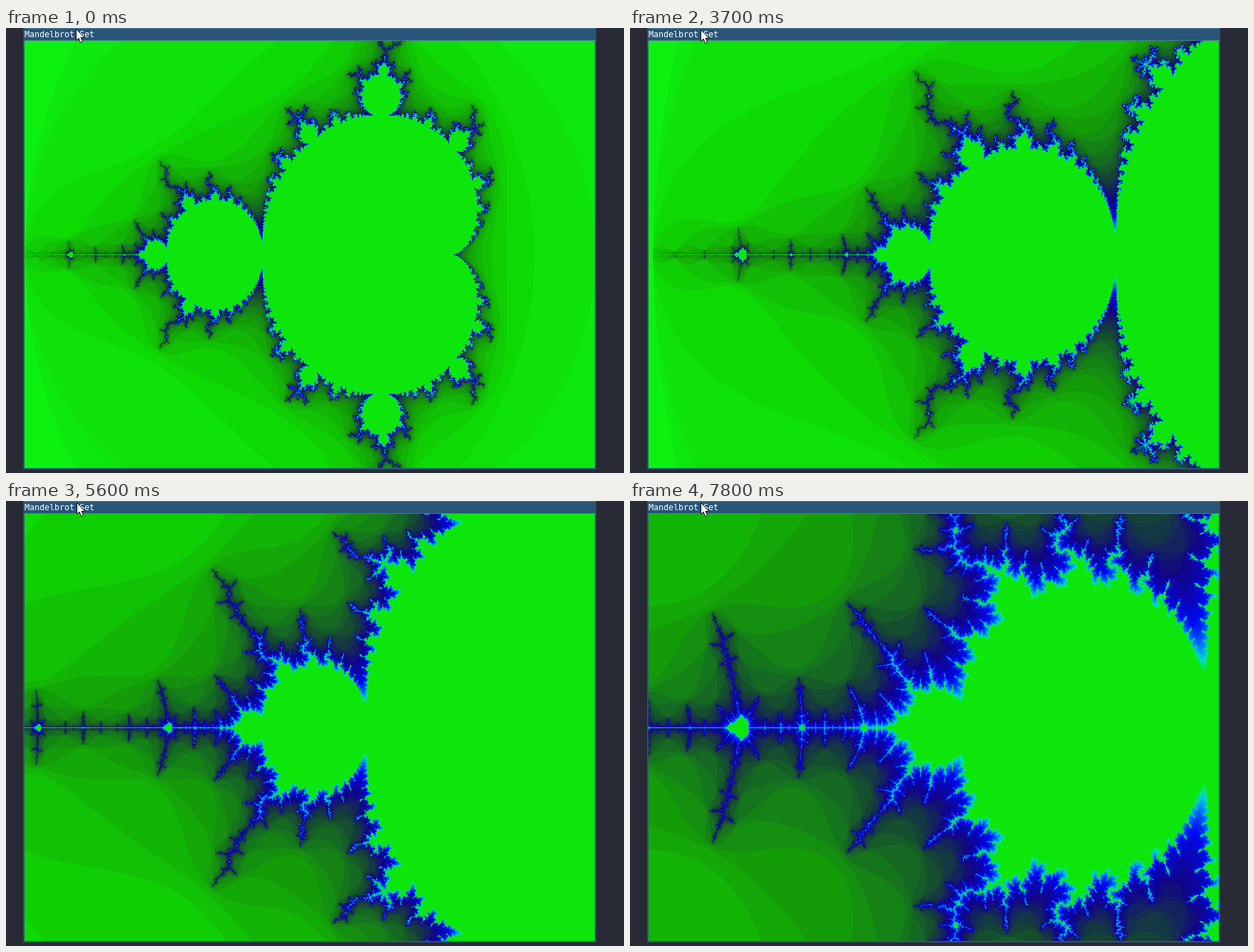
These frames come from a looping animation (867x625 px, 8000 ms). An HTML page with a canvas:

```html
<!DOCTYPE html>
<html lang="en">
<head>
<meta charset="utf-8">
<title>Fractal zoom</title>
<style>
  html, body { margin: 0; width: 100%; height: 100%; overflow: hidden; background: #282a36; }
  canvas { display: block; }
</style>
</head>
<body>
<canvas id="stage" width="867" height="625"></canvas>
<script>
const ctx = document.getElementById("stage").getContext("2d");
const LOOP = 8000;
const LEFT = 26, TOP = 18, W = 800, H = 600;
const MAX_ITER = 64;
const ZOOM_STEP = 1.1, PAN_STEP = 0.2;

// Input log, "time:keys": z = zoom in, l / r = pan left / right
const INPUT = "0: 2000:z 2200:l 2900:zlzl 3100:zl 3400:zllz 3700:zl 4000:zlll 4300:zz " +
  "4800:zz 5200:zrz 5600:zz 6100:zl 6600:lzzl 7000:zzz 7400:zz 7800:zl";

// Colours from fast to slow escape, at their iteration counts
const RAMP = [
  { k: 1, rgb: [13, 241, 17] },
  { k: 4, rgb: [14, 218, 3] },
  { k: 9, rgb: [20, 156, 8] },
  { k: 16, rgb: [21, 66, 54] },
  { k: 22, rgb: [17, 4, 135] },
  { k: 33, rgb: [0, 8, 245] },
  { k: 45, rgb: [0, 145, 255] },
  { k: 53, rgb: [0, 222, 205] },
  { k: MAX_ITER, rgb: [12, 230, 11] }
];

const pack = ([r, g, b]) => (255 << 24 | b << 16 | g << 8 | r) >>> 0;

function rampColour(k) {
  const i = Math.max(1, RAMP.findIndex(stop => stop.k >= k));
  const a = RAMP[i - 1], b = RAMP[i];
  const t = (k - a.k) / (b.k - a.k);
  return pack(a.rgb.map((v, n) => Math.round(v + (b.rgb[n] - v) * t)));
}

function buildViews() {
  let zoom = 1, offset = 0;
  return INPUT.split(" ").map(entry => {
    const [start, keys] = entry.split(":");
    for (const key of keys) {
      if (key === "z") zoom *= ZOOM_STEP;
      else offset += (key === "r" ? PAN_STEP : -PAN_STEP) / zoom;
    }
    return { start: Number(start), zoom, offset, image: null };
  });
}

const palette = Uint32Array.from({ length: MAX_ITER + 1 }, (_, k) => rampColour(Math.max(1, k)));
const INSIDE = palette[MAX_ITER];
const views = buildViews();

function colourAt(cx, cy) {
  // Shortcut for the main cardioid and the period-2 disc
  const y2 = cy * cy, p = cx - 0.25, q = p * p + y2;
  if (q * (q + p) < 0.25 * y2 || (cx + 1) * (cx + 1) + y2 < 0.0625) return INSIDE;
  let x = 0, y = 0;
  for (let k = 1; k <= MAX_ITER; k++) {
    const nx = x * x - y * y + cx;
    y = 2 * x * y + cy;
    x = nx;
    if (x * x + y * y > 4) return palette[k];
  }
  return INSIDE;
}

function render(view) {
  const image = new ImageData(W, H);
  const pixels = new Uint32Array(image.data.buffer);
  const mid = H / 2;
  for (let row = 0; row <= mid; row++) {
    const cy = (row / mid - 1) / view.zoom;
    const at = row * W;
    for (let col = 0; col < W; col++) {
      pixels[at + col] = colourAt(view.offset + (col / W * 3 - 2) / view.zoom, cy);
    }
    // The set is symmetric about the real axis
    if (row > 0 && row < mid) pixels.copyWithin((H - row) * W, at, at + W);
  }
  view.image = image;
}

function rect(colour, x, y, w, h) {
  ctx.fillStyle = colour;
  ctx.fillRect(x, y, w, h);
}

function drawWindow() {
  rect("#282a36", 0, 0, 867, 625);
  rect("#285577", 24, 0, 804, 620);
  rect("#4c7899", 24, 0, 804, 1);
  rect("#4c7899", 24, 17, 804, 1);
  ctx.fillStyle = "#fff";
  ctx.font = '11.63px "DejaVu Sans Mono", monospace';
  ctx.fillText("Mandelbrot Set", LEFT, 13);
}

function pointerAt(time) {
  if (time < 200) return [98, 1];
  return time >= 400 && time < 600 ? [91, 0] : [99, 2];
}

function drawPointer(x, y) {
  const arrow = new Path2D("M.5 .5V16.5L4 13.2L6.7 19.6L9.5 18.4L6.9 12.3H11.6Z");
  ctx.save();
  ctx.translate(x, y);
  ctx.fillStyle = "#fff";
  ctx.strokeStyle = "#111";
  ctx.lineWidth = 1;
  ctx.fill(arrow);
  ctx.stroke(arrow);
  ctx.restore();
}

function draw(now) {
  const time = now % LOOP;
  const view = views.filter(v => v.start <= time).pop();
  if (!view.image) render(view);
  drawWindow();
  ctx.putImageData(view.image, LEFT, TOP);
  drawPointer(...pointerAt(time));

  // Prepare one later view per tick while the first one is held
  const pending = views.find(v => !v.image);
  if (pending) render(pending);
  requestAnimationFrame(tick);
}

let origin = null;
function tick(now) {
  if (origin === null) origin = now;
  draw(now - origin);
}
draw(0);
</script>
</body>
</html>
```
